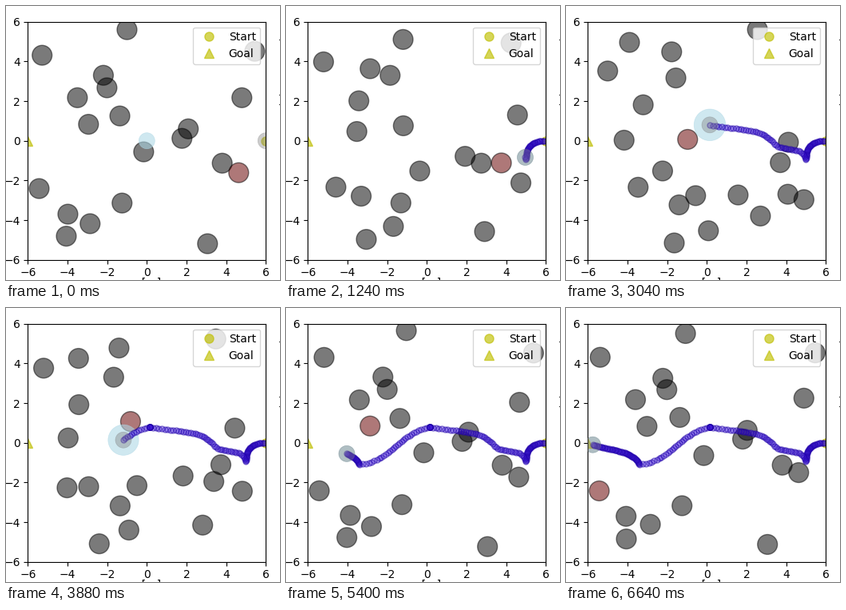
Write a matplotlib script that moves like this. It is 343 px wide and 343 px high and loops after 7.08 s.

```python
import numpy as np
import matplotlib.pyplot as plt
from matplotlib.animation import FuncAnimation
from matplotlib.lines import Line2D
from matplotlib.patches import Circle

SIZE, DPI = 343, 100
FRAMES, STEP = 177, 40
LAST = 166                      # motion ends here, then holds
ROAM = 140                      # frames for an obstacle to go out and return
LEFT, BOTTOM, SIDE = 27.3, 25.3, 298
UNIT = SIDE / 12                # pixels per data unit
GAP = 1.0                       # obstacles keep this far from the robot

rng = np.random.default_rng(4)
ticks = np.arange(LAST + 1)

# Each obstacle: home x, y and turning point x, y
obstacles = np.array([
    (-5.28, 4.31, -5.1, 3.5), (-1, 5.6, -1.7, 4.5), (5.44, 4.51, 2.5, 5.6),
    (-2.19, 3.3, -1.5, 3.2), (-2.01, 2.67, -4, 5), (-3.5, 2.17, -3.3, 1.8),
    (-1.36, 1.25, -0.95, 0), (-2.94, 0.83, -4.3, 0), (4.79, 2.17, 4.1, -0.1),
    (2.09, 0.6, 1.6, -2.8), (1.77, 0.12, 4.1, -2.8), (-0.16, -0.56, -0.6, -2.8),
    (3.8, -1.13, 3.7, -1.1), (4.63, -1.61, 4.9, -3), (-5.43, -2.41, -3.4, -2.3),
    (-1.25, -3.14, -1.4, -3.2), (-3.98, -3.7, -2.3, -1.5), (-2.86, -4.18, 0.1, -4.6),
    (-4.06, -4.81, -1.6, -5.2), (3.06, -5.19, 2.7, -3.7)])
home, turn = obstacles[:, :2], obstacles[:, 2:]
sway = rng.uniform(-0.12, 0.12, home.shape)
sway_rate = rng.uniform(0.06, 0.12, home.shape)

# Robot legs: first and last frame, then Bezier points
legs = [
    (0, 30, (6, 0), (5.2, 0), (5, -0.4), (5, -0.95)),
    (30, 48, (5, -0.95), (4.8, -0.2), (3.9, -0.6), (3.4, -0.16)),
    (48, 76, (3.4, -0.16), (2.8, 0.7), (1.6, 0.5), (0.15, 0.8)),
    (86, 116, (0.15, 0.8), (-1.4, 0.5), (-1.7, -0.9), (-3.4, -1.1)),
    (116, 166, (-3.4, -1.1), (-3.7, -0.4), (-4.8, -0.4), (-5.75, -0.1)),
]


def bezier(points, u):
    a, b, c, d = np.array(points)
    v = 1 - u
    return v**3 * a + 3 * v**2 * u * b + 3 * v * u**2 * c + u**3 * d


def robot_at(k):
    start, end, *points = [leg for leg in legs if leg[0] <= k][-1]
    return bezier(points, min((k - start) / (end - start), 1))


def obstacles_at(k):
    """Out to the turning point and home again, stepping aside for the robot."""
    out = np.sin(np.pi * min(k / ROAM, 1)) ** 2
    pos = home + (turn - home) * out + sway * np.sin(sway_rate * k)
    away = pos - path[k]
    dist = np.hypot(*away.T)[:, None]
    return path[k] + away * np.maximum(dist, GAP) / dist


def margin_at(k):
    """Safety radius swells in the crowded middle of the route."""
    return (10 + 10 * np.sin(np.pi * np.clip((k - 31) / 104, 0, 1))) / UNIT


path = np.array([robot_at(k) for k in ticks])

fig = plt.figure(figsize=(SIZE / DPI, SIZE / DPI), dpi=DPI, facecolor="white")
ax = fig.add_axes([LEFT / SIZE, BOTTOM / SIZE, SIDE / SIZE, SIDE / SIZE])
ax.set(xlim=(-6, 6), ylim=(-6, 6),
       xticks=range(-6, 7, 2), yticks=range(-6, 7, 2))

discs = [ax.add_patch(Circle(p, 0.5, lw=1, ec=(0, 0, 0, 0.5))) for p in home]
zone = ax.add_patch(Circle((0, 0), 1, color="lightblue", alpha=0.58, lw=0.5))
robot = ax.add_patch(Circle((6, 0), 10 / UNIT, color="gray", alpha=0.4,
                            lw=0.5, zorder=3))

for x, marker, name in ((6, "o", "Start"), (-6, "^", "Goal")):
    ax.plot(x, 0, marker, color="y", alpha=0.65, ms=8, ls="", label=name)
trail, = ax.plot([], [], "o", ms=5, mew=1, ls="",
                 mfc=(0.25, 0.1, 0.85, 0.35), mec=(0.12, 0, 0.66, 0.5))
ax.legend(loc="upper right")

# Labels cut off by the stage edge
fig.text(176 / SIZE, 3 / SIZE, "x [m]", ha="center", va="top", fontsize=10)
for y in (42, 111, 123):
    fig.add_artist(Line2D([341.5 / SIZE, 1], [1 - y / SIZE] * 2, color="0.2", lw=0.8))


def update(frame):
    k = min(frame, LAST)
    spots = obstacles_at(k)
    nearest = np.argmin(np.hypot(*(spots - path[k]).T))
    for i, (disc, spot) in enumerate(zip(discs, spots)):
        disc.center = spot
        disc.set_facecolor((0.4, 0, 0, 0.53) if i == nearest else (0, 0, 0, 0.52))
    robot.center = path[k]
    zone.center = path[k] if k else (0, 0)
    zone.set_radius(margin_at(k))
    trail.set_data(*path[1:k + 1].T)
    return [*discs, zone, robot, trail]


anim = FuncAnimation(fig, update, frames=FRAMES, interval=STEP,
                     repeat=True, repeat_delay=0, blit=False)
plt.show()
```
